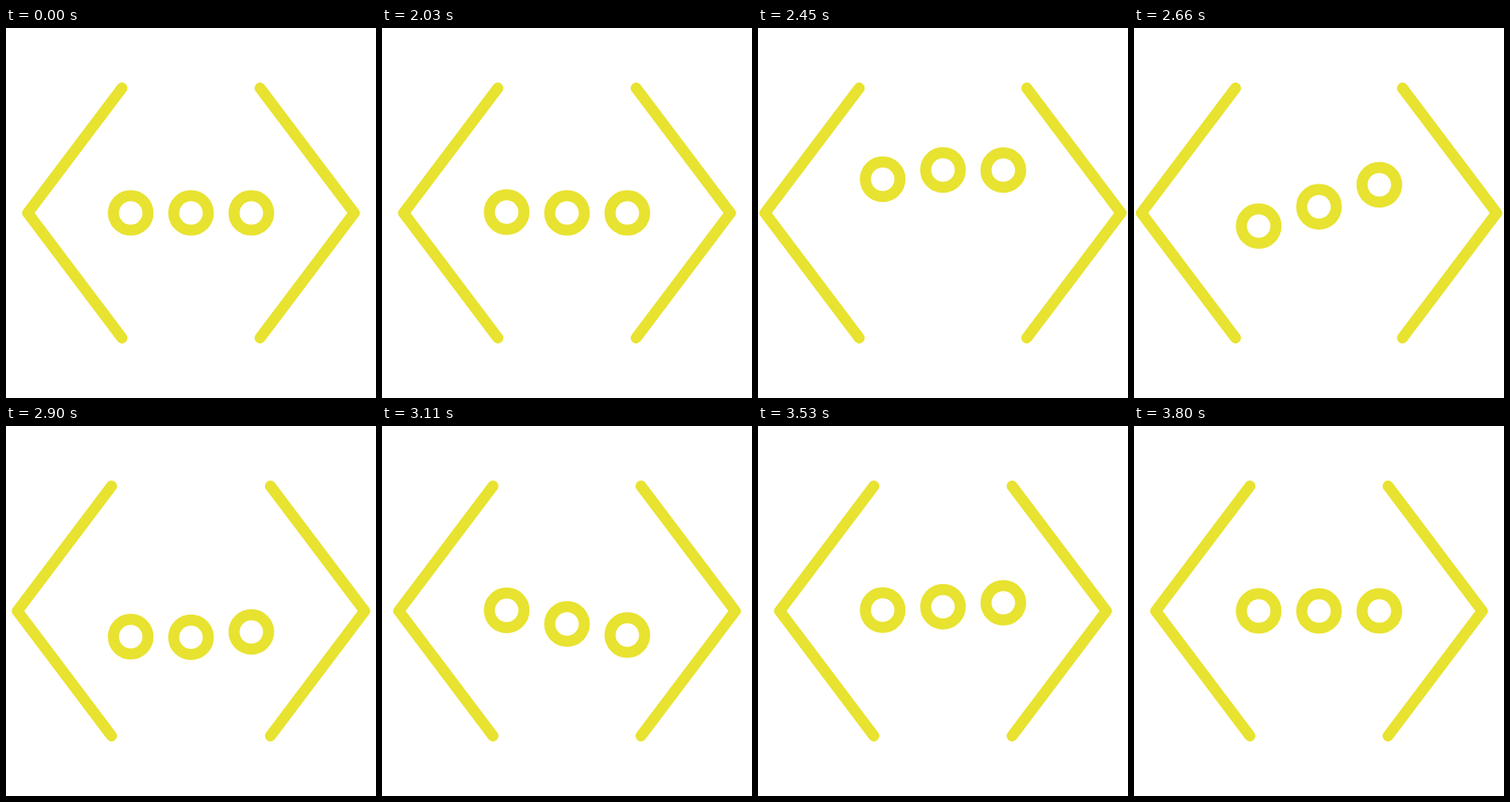
Write an HTML page with a canvas that moves like this. It is 400x400 px and loops after 3.83 s.

```html
<!DOCTYPE html>
<html lang="en">
<head>
<meta charset="utf-8">
<title>Code brackets</title>
<style>
html, body { margin: 0; width: 100%; height: 100%; overflow: hidden; background: #fff; }
canvas { display: block; width: 100vmin; height: 100vmin; }
</style>
</head>
<body>
<canvas id="stage" width="400" height="400"></canvas>
<script>
const ctx = document.getElementById('stage').getContext('2d');
const LOOP = 3830, REST = 2030, STEP = 30, START = 2000, STAGGER = 90;

// [time, value] keys, eased between neighbours
const HOP = [[0, 0], [315, -47.5], [850, 29], [1275, -9.8], [1620, 0]];
const SPREAD = [[0, 0], [510, 16.2], [1600, 0]];

// Cubic bezier ease (.43, 0, .46, 1), solved by bisection
function ease(x) {
  let lo = 0, hi = 1, s = x;
  for (let i = 0; i < 24; i++) {
    s = (lo + hi) / 2;
    const r = 1 - s;
    const bx = 3 * r * r * s * 0.43 + 3 * r * s * s * 0.46 + s * s * s;
    if (bx < x) lo = s; else hi = s;
  }
  return s * s * (3 - 2 * s);
}

function valueAt(keys, t) {
  if (t <= 0) return 0;
  for (let i = 1; i < keys.length; i++) {
    const [t0, a] = keys[i - 1], [t1, b] = keys[i];
    if (t < t1) return a + (b - a) * ease((t - t0) / (t1 - t0));
  }
  return keys[keys.length - 1][1];
}

function bracket(side, spread) {
  const x = d => 200 + side * (d + spread);
  ctx.beginPath();
  ctx.moveTo(x(74.7), 65);
  ctx.lineTo(x(176.5), 200);
  ctx.lineTo(x(74.7), 335);
  ctx.stroke();
}

function ring(x, y) {
  ctx.beginPath();
  ctx.arc(x, y, 18.7, 0, Math.PI * 2);
  ctx.stroke();
}

function draw(time) {
  const t = time < REST ? 0
    : REST + Math.floor((time - REST) / STEP) * STEP - START;
  ctx.fillStyle = '#fff';
  ctx.fillRect(0, 0, 400, 400);
  ctx.strokeStyle = '#e8e230';
  ctx.lineWidth = 12;
  ctx.lineCap = ctx.lineJoin = 'round';

  const spread = valueAt(SPREAD, t);
  bracket(-1, spread);
  bracket(1, spread);
  for (let i = 0; i < 3; i++) {
    ring(134.8 + i * 65.2, 199.9 + valueAt(HOP, t - i * STAGGER));
  }
}

const begin = performance.now();
function tick() {
  draw((performance.now() - begin) % LOOP);
  requestAnimationFrame(tick);
}
tick();
</script>
</body>
</html>
```
